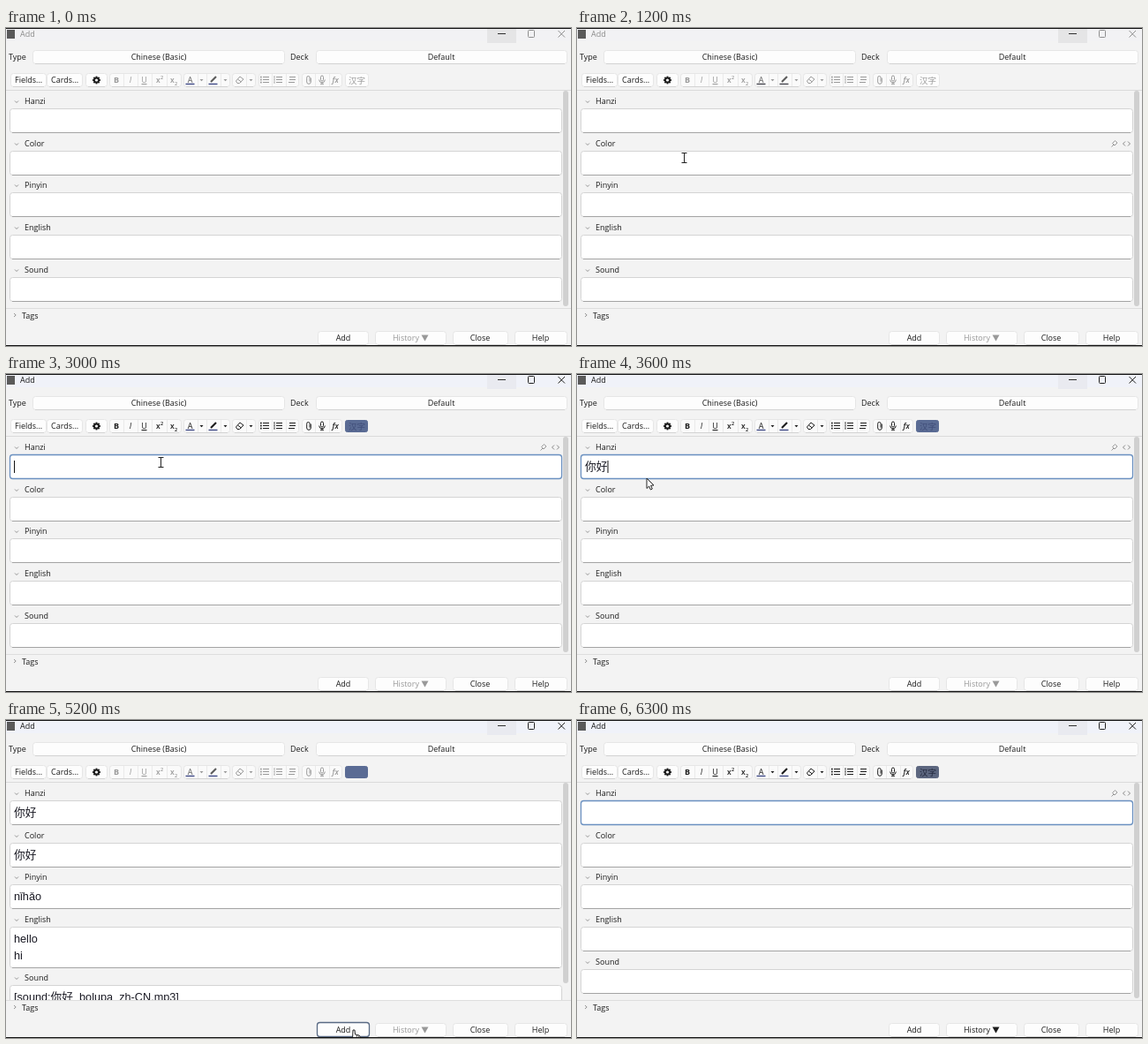
Write an HTML page with a canvas that moves like this. It is 640 px wide and 360 px high and loops after 6400 ms.

```html
<!DOCTYPE html>
<html lang="en">
<head>
<meta charset="utf-8">
<title>Add note</title>
<style>
html, body { margin: 0; width: 100%; height: 100%; overflow: hidden; background: #f3f3f3; }
canvas { display: block; width: 640px; height: 360px; }
</style>
</head>
<body>
<canvas id="stage" width="640" height="360"></canvas>
<script>
const ctx = document.getElementById('stage').getContext('2d');
const LOOP = 6400, STEP = 100;
const UI = '"Open Sans", "Noto Sans", "Noto Sans CJK SC", sans-serif';
const NOTE = '"Liberation Sans", "Noto Sans CJK SC", "Noto Sans CJK JP", sans-serif';
const INK = '#1c1c1c', FAINT = '#999';

// Moments at which the window changes state
const AT = { enter: 500, focus: 1800, press: 2500, type: 3300, blur: 3800, fill: 4000, add: 5000, clear: 5700, leave: 5800 };

// Pointer stops: time, x, y
const STOPS = [
  [500, 300, 366], [1100, 121, 147], [1300, 121, 147], [1700, 62, 106], [1800, 62, 106],
  [2250, 399, 57], [2650, 399, 57], [3200, 79, 118], [3700, 79, 118], [4050, 228, 129],
  [4350, 228, 129], [5100, 394, 351], [5500, 394, 351], [5800, 398, 372]
];

const ease = u => u * u * (3 - 2 * u);

function pointerAt(t) {
  if (t < AT.enter || t >= AT.leave) return null;
  const i = STOPS.findIndex(s => s[0] > t);
  const [t0, x0, y0] = STOPS[i - 1], [t1, x1, y1] = STOPS[i];
  const u = ease((t - t0) / (t1 - t0));
  return { x: x0 + (x1 - x0) * u, y: y0 + (y1 - y0) * u };
}

function text(s, x, y, color = INK, size = 9, opt = {}) {
  ctx.font = `${opt.style || ''} ${size}px ${opt.family || UI}`;
  ctx.textAlign = opt.align || 'left';
  ctx.fillStyle = color;
  ctx.fillText(s, x, y);
}

const centered = (s, x, y, color, size, style) => text(s, x, y, color, size, { align: 'center', style });

function rect(x, y, w, h, color) {
  ctx.fillStyle = color;
  ctx.fillRect(x, y, w, h);
}

function line(points, color, width = 1, close = false) {
  ctx.beginPath();
  points.forEach(([x, y]) => ctx.lineTo(x, y));
  if (close) ctx.closePath();
  ctx.strokeStyle = color;
  ctx.lineWidth = width;
  ctx.stroke();
}

function shape(points, fill, stroke) {
  ctx.beginPath();
  points.forEach(([x, y]) => ctx.lineTo(x, y));
  ctx.closePath();
  ctx.fillStyle = fill;
  ctx.fill();
  if (stroke) {
    ctx.strokeStyle = stroke;
    ctx.lineWidth = 1;
    ctx.stroke();
  }
}

function box(x, y, w, h, fill, border, radius = 3, width = 1) {
  ctx.beginPath();
  ctx.roundRect(x + .5, y + .5, w - 1, h - 1, radius);
  ctx.fillStyle = fill;
  ctx.fill();
  ctx.strokeStyle = border;
  ctx.lineWidth = width;
  ctx.stroke();
}

function button(x, y, w, h, fill = '#fdfdfd') {
  box(x, y, w, h, fill, '#e6e6e6');
  line([[x + 3, y + h - .5], [x + w - 3, y + h - .5]], '#d2d2d2');
}

const chevronDown = (x, y, color, r = 2) => line([[x - r, y - r / 2], [x, y + r / 2], [x + r, y - r / 2]], color, .9);

function drawTitleBar(active) {
  rect(0, 0, 640, 15, active ? '#f0f2f9' : '#f2f2f4');
  rect(545, 0, 33, 17, active ? '#e9eaf0' : '#e5e5e6');
  rect(1, 2, 9, 10, '#5a5a5a');
  text('Add', 16, 10, active ? INK : '#8c8c8c');
  const color = active ? '#202020' : '#8e8e8e';
  line([[557, 6.5], [566, 6.5]], '#303030');
  box(591, 2, 8, 9, 'transparent', color, 1);
  line([[625.5, 3], [633, 10.5]], color);
  line([[633, 3], [625.5, 10.5]], color);
}

function drawSelectors() {
  text('Type', 3, 36);
  button(30, 25, 286, 16);
  centered('Chinese (Basic)', 173, 36);
  text('Deck', 322, 36);
  button(351, 25, 285, 16);
  centered('Default', 493, 36);
}

function drawGear(x, y) {
  for (let i = 0; i < 8; i++) {
    const a = i * Math.PI / 4, c = Math.cos(a), s = Math.sin(a);
    line([[x + c * 2.5, y + s * 2.5], [x + c * 4.4, y + s * 4.4]], INK, 1.8);
  }
  ctx.beginPath();
  ctx.arc(x, y, 2.5, 0, 7);
  ctx.lineWidth = 1.9;
  ctx.stroke();
}

function drawList(x, y, kind, color) {
  for (let i = -1; i <= 1; i++) {
    const row = y + i * 3 + .5;
    if (kind === 'align') line([[x - 4 + (i === 1 ? 0 : 1), row], [x + 4 - (i === 1 ? 1 : 0), row]], color);
    else {
      line([[x - 2, row], [x + 5, row]], color);
      if (kind === 'bullet') rect(x - 5, row - .8, 1.7, 1.7, color);
      else line([[x - 4, row - 1.2], [x - 4, row + 1.2]], color);
    }
  }
}

function drawClip(x, y, color) {
  ctx.beginPath();
  ctx.moveTo(x + 2.3, y - 2.5);
  ctx.lineTo(x + 2.3, y + 2);
  ctx.arc(x, y + 2, 2.3, 0, Math.PI);
  ctx.lineTo(x - 2.3, y - 2.5);
  ctx.arc(x - .6, y - 2.8, 1.7, Math.PI, 0);
  ctx.lineTo(x + 1, y + 1.7);
  ctx.strokeStyle = color;
  ctx.lineWidth = 1;
  ctx.stroke();
}

function drawMic(x, y, color) {
  box(x - 2, y - 5, 4, 7, 'transparent', color, 1.5);
  ctx.beginPath();
  ctx.arc(x, y, 3.3, 0, Math.PI);
  ctx.stroke();
  line([[x, y + 3], [x, y + 5]], color);
  line([[x - 2, y + 4.8], [x + 2, y + 4.8]], color);
}

function drawToolbar(t, enabled) {
  const color = enabled ? INK : FAINT;
  button(5, 51, 41, 16);
  text('Fields...', 10, 62);
  button(46, 51, 41, 16);
  text('Cards...', 51, 62);
  button(90, 51, 25, 16);
  drawGear(102.5, 59);

  const groups = [[117, 82], [201, 53], [256, 27], [286, 46], [335, 46]];
  groups.forEach(([x, w]) => button(x, 51, w, 16, '#fafafa'));
  for (const x of [133, 149, 165, 182, 217, 227, 243, 272, 301, 317, 350, 366]) rect(x, 52, 1, 14, '#eaeaea');

  centered('B', 125, 62, color, 9, 'bold');
  centered('I', 141, 62, color, 9, 'italic');
  centered('U', 156.5, 62, color);
  line([[153.5, 63.5], [159.5, 63.5]], color);
  for (const [x, y] of [[170, 57.5], [186, 64.5]]) {
    text('x', x, 62, color, 8.5, { style: '600' });
    text('2', x + 5, y + .5, color, 5.5, { style: '600' });
  }
  const plain = t >= AT.enter && t < AT.press;
  const tint = plain ? '#4c4c55' : '#46508a';
  const pen = enabled ? INK : '#5c5c5c';
  centered('A', 208.5, 61.5, pen, 9);
  rect(203.5, 62.7, 10, 1.5, tint);
  line([[232, 61], [238, 55]], pen, 2.2);
  rect(229.5, 62.7, 10, 1.5, tint);
  line([[260.5, 60], [265, 55], [269, 58], [264.5, 62.5], [262, 62.5]], color, 1, true);
  line([[262.5, 58], [266.5, 61]], color);
  for (const x of [221.5, 248.5, 277.5]) shape([[x - 2, 58], [x + 2, 58], [x, 60.3]], color);
  drawList(293, 58, 'bullet', color);
  drawList(308, 58, 'number', color);
  drawList(324, 58, 'align', color);
  drawClip(343, 59, color);
  drawMic(358, 58.5, color);
  centered('fx', 373.2, 62, color, 8.5, 'italic 600');
  drawHanziButton(t, color);
}

function drawHanziButton(t, color) {
  if (t < AT.press) {
    button(384, 51, 27, 16);
    centered('汉字', 397.5, 62.5, color, 9.5);
    return;
  }
  const refocused = t >= AT.clear;
  const fill = refocused ? '#5c667f' : '#5a6b94';
  box(384, 52, 26, 14, fill, fill, 2);
  if (refocused) centered('汉字', 397.5, 62.5, '#20263a', 9.5);
  else if (t < AT.blur) centered('汉字', 397.5, 62.5, '#3f4d78', 9.5);
}

function drawHoverIcons(y) {
  line([[605.5, y + 3.5], [608, y + 1]], '#999');
  line([[606.5, y - .5], [609.5, y - 3.5], [612, y - 1], [609, y + 2]], '#999', 1, true);
  line([[621, y - 2.5], [618.5, y], [621, y + 2.5]], '#888');
  line([[624, y - 2.5], [626.5, y], [624, y + 2.5]], '#888');
}

function noteFields(t) {
  const filled = t >= AT.fill && t < AT.clear;
  const typed = t >= AT.type && t < AT.clear;
  const values = [
    typed ? ['你好'] : [],
    filled ? ['你好'] : [],
    filled ? ['nǐhǎo'] : [],
    filled ? ['hello', 'hi'] : [],
    filled ? ['[sound:你好_bolupa_zh-CN.mp3]'] : []
  ];
  let top = 91;
  return ['Hanzi', 'Color', 'Pinyin', 'English', 'Sound'].map((name, i) => {
    const h = 28 + 18.7 * Math.max(0, values[i].length - 1);
    const field = { name, lines: values[i], y: top, h };
    top += h + 19.65;
    return field;
  });
}

function caretVisible(t) {
  const since = t >= AT.clear ? AT.clear : t >= AT.type ? AT.type : AT.focus;
  return (t - since) % 1060 < 530;
}

function drawFields(t, fields, focused, pointer) {
  ctx.save();
  ctx.beginPath();
  ctx.rect(0, 71, 640, 247);
  ctx.clip();
  fields.forEach(({ name, lines, y, h }, i) => {
    const top = Math.round(y), height = Math.round(h), active = focused && i === 0;
    chevronDown(12, top - 7.5, '#888');
    text(name, 21, y - 5);
    const hovered = pointer && pointer.y > y - 16 && pointer.y < y + h && pointer.x < 631;
    if (active || hovered) drawHoverIcons(top - 8);
    box(4, top, 626, height, '#fff', active ? '#6a90c0' : '#d4d4d4', 3, active ? 1.3 : 1);
    if (!active) line([[7, top + height - .5], [627, top + height - .5]], '#a4a4a4');
    lines.forEach((s, n) => text(s, 9, y + 18 + n * 18.7, '#1a1a24', 12.7, { family: NOTE }));
    if (active && caretVisible(t)) rect(lines.length ? 34.5 : 9, top + 7, 1, 14, '#111');
  });
  ctx.restore();

  const filled = fields[3].lines.length > 1;
  ctx.beginPath();
  ctx.roundRect(631, 71, 6, filled ? 227 : 244, 3);
  ctx.fillStyle = '#d0d0d0';
  ctx.fill();
}

function drawFooter(t) {
  rect(0, 317, 640, 1, '#dedede');
  line([[9, 323], [11.2, 325], [9, 327]], '#888', .9);
  text('Tags', 18, 329);
  const history = t >= AT.clear ? INK : FAINT;
  for (const [label, x, w, mid, color] of [
    ['Add', 353, 58, 382, INK], ['History', 418, 81, 453, history],
    ['Close', 506, 63, 537, INK], ['Help', 576, 60, 605.5, INK]
  ]) {
    button(x, 343, w, 16);
    centered(label, mid, 354, color);
  }
  shape([[470.5, 347.5], [478.5, 347.5], [474.5, 354.5]], history);
  if (t >= AT.add && t < AT.clear) {
    box(352, 342, 60, 17, '#fdfdfd', '#596a84', 3, 1.3);
    centered('Add', 382, 354);
  }
}

function drawPointer({ x, y }, fields) {
  const inField = x > 5 && x < 629 && fields.some(f => y > f.y + 1 && y < Math.min(f.y + f.h - 2, 317));
  const onButton = (y > 50 && y < 67 && x > 5 && x < 411) || (y > 342 && x > 353 && x < 411);
  ctx.save();
  ctx.translate(Math.round(x), Math.round(y));
  if (inField) {
    line([[-2.5, -5.5], [3.5, -5.5]], '#222');
    line([[.5, -5.5], [.5, 5.5]], '#222');
    line([[-2.5, 5.5], [3.5, 5.5]], '#222');
  } else if (onButton) {
    shape([[-1, 0], [1, 0], [1.5, 5], [6, 6], [7.5, 8], [7, 13], [5, 17], [-1, 17], [-5, 11], [-4, 9.5], [-1.5, 11]], '#fff', '#222');
    line([[3.5, 6], [3.5, 9]], '#222', .7);
    line([[5.5, 6.5], [5.5, 9]], '#222', .7);
  } else {
    shape([[0, 0], [0, 11.5], [2.6, 9], [4.4, 13], [6.3, 12], [4.6, 8.2], [8, 8]], '#fff', '#222');
  }
  ctx.restore();
}

function draw(t) {
  const pointer = pointerAt(t);
  const fields = noteFields(t);
  const focused = (t >= AT.focus && t < AT.blur) || t >= AT.clear;
  rect(0, 0, 640, 360, '#f3f3f3');
  drawTitleBar(t >= AT.focus);
  drawSelectors();
  drawToolbar(t, focused);
  rect(0, 70, 640, 1, '#dadada');
  drawFields(t, fields, focused, pointer);
  drawFooter(t);
  if (pointer) drawPointer(pointer, fields);
  rect(0, 0, 640, 1, '#111');
  rect(0, 359, 640, 1, '#111');
}

const start = performance.now();
function tick() {
  const t = (performance.now() - start) % LOOP;
  draw(Math.floor(t / STEP) * STEP);
  requestAnimationFrame(tick);
}
tick();
</script>
</body>
</html>
```
